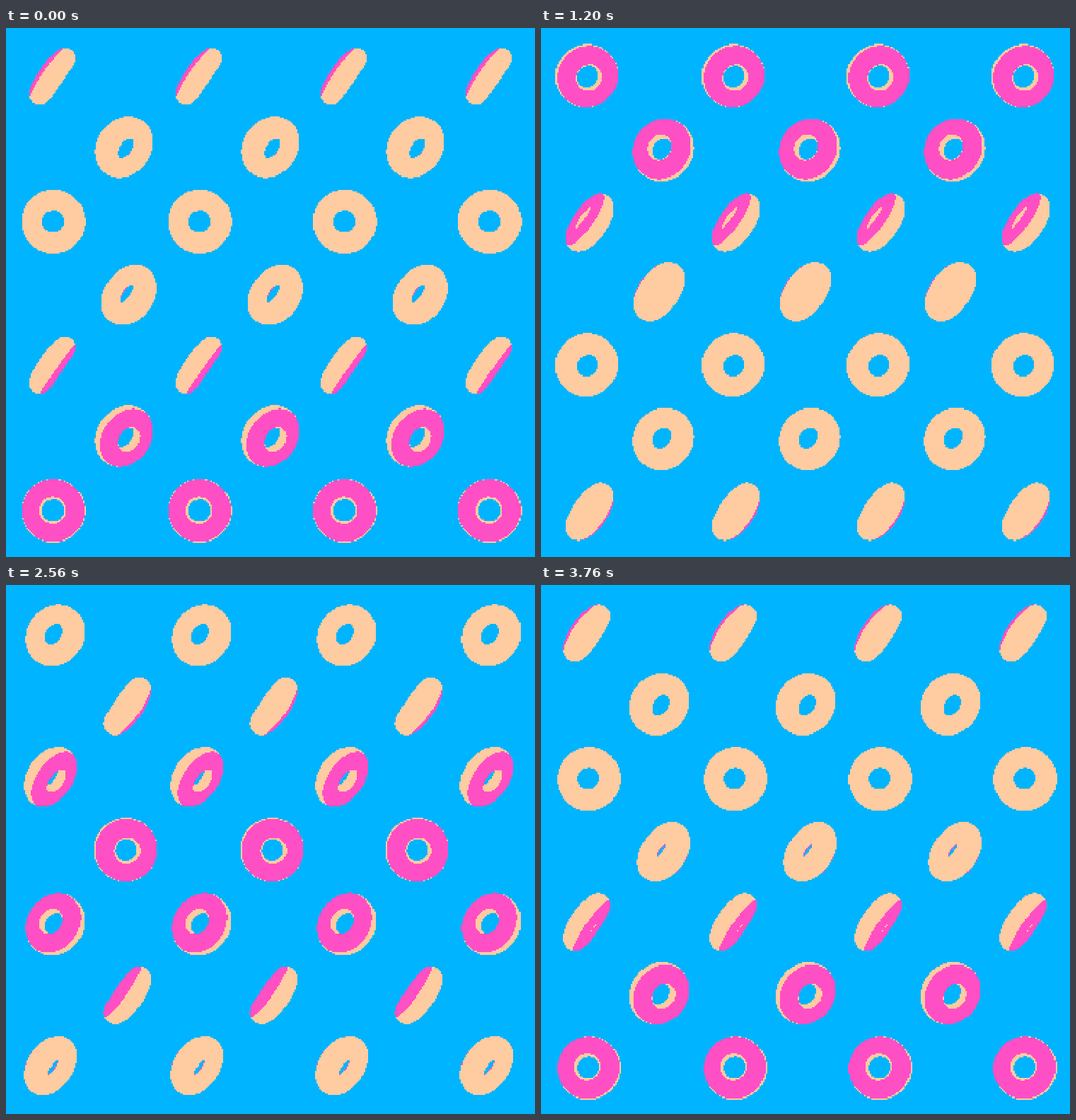
An HTML page with a canvas for the animation above (3840 ms loop, 748 by 748 pixels).

```html
<!DOCTYPE html>
<html lang="en">
<head>
<meta charset="utf-8">
<title>Donuts</title>
<style>
html, body { margin: 0; width: 100%; height: 100%; overflow: hidden; background: #00b4ff; }
canvas { display: block; width: 748px; height: 748px; image-rendering: pixelated; }
</style>
</head>
<body>
<canvas id="stage" width="365" height="366"></canvas>
<script>
const W = 365, H = 366, UNIT = 748 / W;
const STEP = 80, STEPS = 48;
const RING = 30.25, TUBE = 14.5, ICING = 8, EYE = 180;
const TILT = 35 * Math.PI / 180;
const UX = Math.cos(TILT), UY = Math.sin(TILT);
const PITCH_X = 100.3, PITCH_Y = 100, REACH = 25;

const ctx = document.getElementById('stage').getContext('2d');
const image = ctx.createImageData(W, H);
const pixels = new Uint32Array(image.data.buffer);
const rgb = (r, g, b) => (255 << 24 | b << 16 | g << 8 | r) >>> 0;
const SKY = rgb(0, 180, 255), DOUGH = rgb(255, 203, 160), PINK = rgb(255, 79, 196);

// Colour of the torus seen through point (x, y) of the picture plane.
function trace(x, y, nx, ny, nz) {
  const len = Math.hypot(x, y, EYE);
  const dx = x / len, dy = y / len, dz = -EYE / len;
  let t = EYE - 48;
  for (let i = 0; i < 400 && t < EYE + 70; i++) {
    const px = dx * t, py = dy * t, pz = EYE + dz * t;
    const h = px * nx + py * ny + pz * nz;
    const rho = Math.sqrt(Math.max(0, px * px + py * py + pz * pz - h * h));
    const dist = Math.hypot(rho - RING, h) - TUBE;
    if (dist < 0.05) return h > ICING ? PINK : DOUGH;
    t += dist;
  }
  return SKY;
}

function drawRow(row, step) {
  const odd = row % 2;
  const cx = odd ? 83.1 : 32.4;
  const cy = (odd ? 83.5 : 33.8) + PITCH_Y * (row >> 1);
  const cols = odd ? 3 : 4;
  const angle = (step - 12.6 - 6 * row) / STEPS * 2 * Math.PI;
  const s = Math.sin(angle), nx = s * UX, ny = s * UY, nz = Math.cos(angle);
  const left = Math.floor(cx) - REACH, top = Math.floor(cy) - REACH;
  for (let y = top; y <= top + 2 * REACH; y++) {
    for (let x = left; x <= left + 2 * REACH; x++) {
      const color = trace((x + 0.5 - cx) * UNIT, (y + 0.5 - cy) * UNIT, nx, ny, nz);
      if (color === SKY) continue;
      for (let c = 0; c < cols; c++) pixels[y * W + x + Math.ceil(c * PITCH_X)] = color;
    }
  }
}

function draw(step) {
  pixels.fill(SKY);
  for (let row = 0; row < 7; row++) drawRow(row, step);
  ctx.putImageData(image, 0, 0);
}

let start = null, shown = 0;
function tick(now) {
  if (start === null) start = now;
  const step = Math.floor(Math.max(0, now - start) / STEP) % STEPS;
  if (step !== shown) draw(shown = step);
  requestAnimationFrame(tick);
}
draw(0);
requestAnimationFrame(tick);
</script>
</body>
</html>
```
